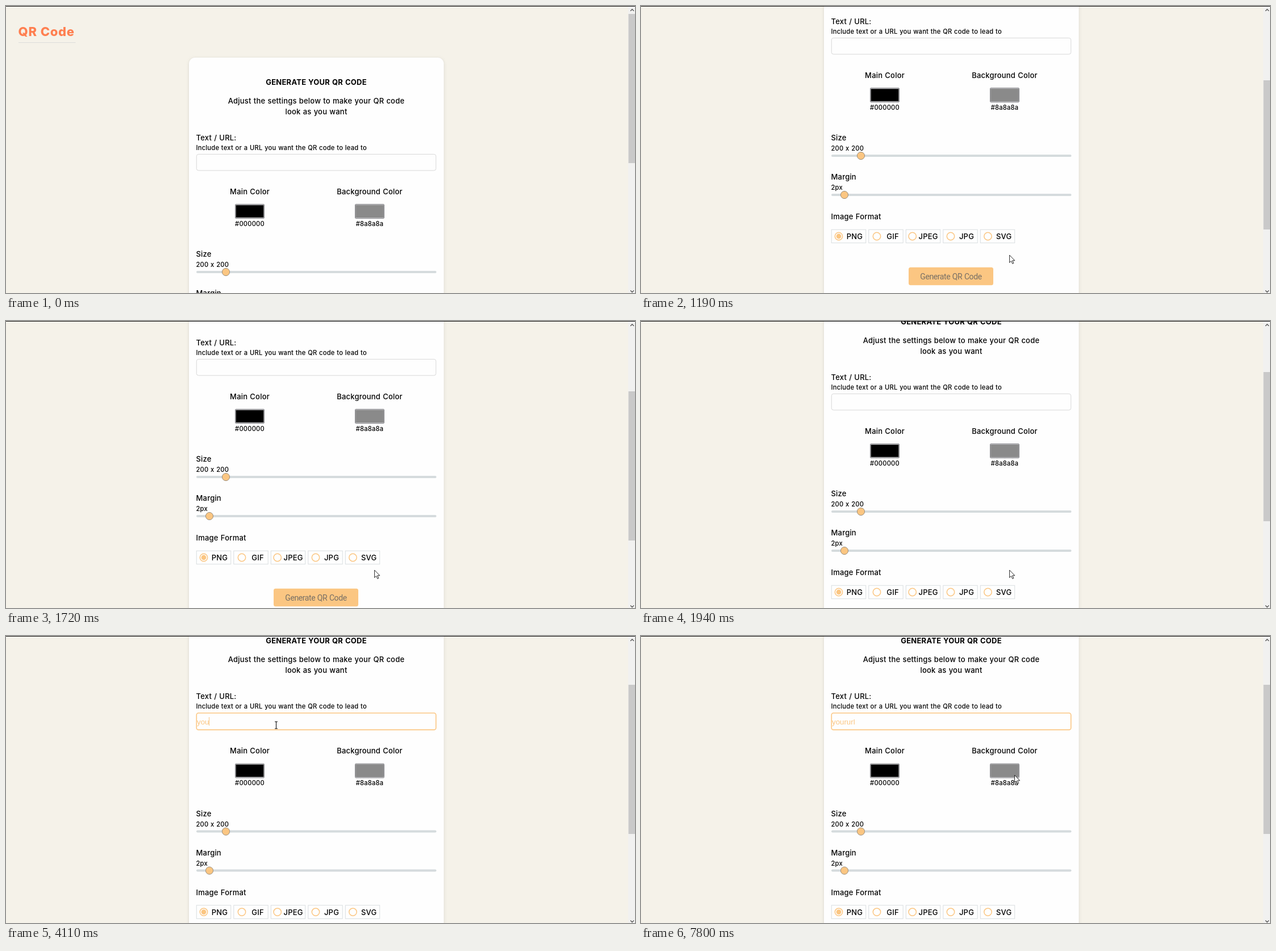
Recreate the animation shown at these times as an HTML page. Size 1107x506 px, loop 8000 ms.

```html
<!DOCTYPE html>
<html lang="en">
<head>
<meta charset="utf-8">
<title>QR code form</title>
<style>
  html, body { margin: 0; width: 100%; height: 100%; overflow: hidden; background: #f5f2e9; }
  svg { display: block; }
  text { font-family: Inter, "Open Sans", sans-serif; font-size: 13px; font-weight: 500; letter-spacing: .2px; word-spacing: .5px; fill: #000; }
  .small { font-size: 11.2px; }
  .mid { text-anchor: middle; }
  .head { font-weight: 700; letter-spacing: .25px; }
  .title { font-size: 22px; font-weight: 800; letter-spacing: .7px; fill: #ff7f50; }
  .button { font-family: Roboto, sans-serif; font-size: 14px; font-weight: 400; letter-spacing: -.4px; fill: #776f65; }
  .typed { font-family: "Liberation Sans", Arial, sans-serif; font-size: 13.3px; font-weight: 400; letter-spacing: 0; fill: #fbc682; }
</style>
</head>
<body>
<svg id="stage" width="1107" height="506" viewBox="0 0 1107 506">
  <defs>
    <filter id="shadow" x="-5%" y="-5%" width="110%" height="110%">
      <feDropShadow dx="0" dy="1" stdDeviation="2.5" flood-color="#8a8a80" flood-opacity=".3"/>
    </filter>
  </defs>
  <rect width="1107" height="506" fill="#f5f2e9"/>
  <g id="page">
    <text class="title" x="21.5" y="52.7">QR Code</text>
    <path d="M22 64.5H122.5" stroke="#dcdcda"/>
    <rect x="322" y="91" width="448.5" height="631" rx="11" fill="#fefefe" filter="url(#shadow)"/>
    <text class="mid head" x="546" y="139">GENERATE YOUR QR CODE</text>
    <text class="mid" x="546" y="171.7">Adjust the settings below to make your QR code</text>
    <text class="mid" x="546" y="191.2">look as you want</text>
    <text x="334.5" y="236.8">Text / URL:</text>
    <text class="small" x="334.5" y="254">Include text or a URL you want the QR code to lead to</text>
    <rect id="field" x="335.3" width="421.4" rx="3.5" fill="#fefefe"/>
    <text id="typed" class="typed" x="336" y="281.7"></text>
    <path id="caret" stroke="#fbc682"/>
    <g id="lower"></g>
  </g>
  <rect x="1095" width="12" height="506" fill="#f1f1f0"/>
  <rect id="thumb" x="1095.5" width="11.5" height="263" fill="#c9c9c9"/>
  <path d="M1099 8.8L1102 5.8L1105 8.8M1099 501.5L1102 504.5L1105 501.5" fill="none" stroke="#555" stroke-width="1.4"/>
  <path d="M0 .5H1107" stroke="#161616"/>
  <path id="arrow" d="M0 0V13.2L3 10.4L5.2 15.2L7.3 14.2L5.1 9.6H9.3Z" fill="#fff" stroke="#111" stroke-width=".9" stroke-linejoin="round"/>
  <path id="beam" d="M-2.5 -6H-.6L0 -5.4L.6 -6H2.5M0 -5.5V5.8M-2.5 6.3H-.6L0 5.7L.6 6.3H2.5" fill="none" stroke="#111" stroke-width="1.1"/>
</svg>
<script>
const LOOP = 8000, ORANGE = '#fbc682';
const el = id => document.getElementById(id);
const [page, field, typed, caret, lower, thumb, arrow, beam] =
  ['page', 'field', 'typed', 'caret', 'lower', 'thumb', 'arrow', 'beam'].map(el);

const label = (x, y, str, cls = '') => `<text x="${x}" y="${y}" class="${cls}">${str}</text>`;

const swatch = (cx, name, color) =>
  label(cx, 331.6, name, 'mid') +
  `<rect x="${cx - 25.5}" y="349.5" width="51" height="25" rx="1.5" fill="#e9e9ed" stroke="#858589"/>
   <rect x="${cx - 24.3}" y="351" width="48.6" height="22" fill="${color}" stroke="#777" stroke-width=".6"/>` +
  label(cx, 387.8, color, 'mid small');

const slider = (y, name, value, knob) =>
  label(334.5, y - 26.8, name) + label(334.5, y - 9, value, 'small') +
  `<rect x="335" y="${y - 2}" width="422.5" height="4" rx="2" fill="#d5dbdd"/>
   <circle cx="${knob}" cy="${y}" r="6.6" fill="${ORANGE}" stroke="#9a8f80"/>`;

const option = ([name, dot, x], i) =>
  `<rect x="${335.3 + i * 65.5}" y="599.2" width="60.4" height="23.5" fill="none" stroke="#d9dee0"/>
   <circle cx="${dot}" cy="611" r="6.7" fill="none" stroke="${ORANGE}" stroke-width="1.5"/>` +
  (i ? '' : `<circle cx="${dot}" cy="611" r="4.4" fill="${ORANGE}"/>`) +
  label(x, 616, name, 'mid');

lower.innerHTML =
  swatch(429, 'Main Color', '#000000') +
  swatch(640, 'Background Color', '#8a8a8a') +
  slider(469, 'Size', '200 x 200', 387) +
  slider(538, 'Margin', '2px', 358) +
  label(334.5, 581, 'Image Format') +
  [['PNG', 348, 376], ['GIF', 415, 443], ['JPEG', 477.7, 505.7], ['JPG', 545, 573], ['SVG', 610.5, 638.7]]
    .map(option).join('') +
  `<rect x="471" y="665.7" width="149" height="31.5" rx="3.5" fill="${ORANGE}"/>` +
  label(545.5, 687, 'Generate QR Code', 'mid button');

const ease = {
  linear: u => u,
  in: u => u * u,
  out: u => 1 - (1 - u) ** 2,
  both: u => u * u * (3 - 2 * u)
};

// Keys are [time, values, easing of the way to this key].
function follow(keys, t) {
  const next = keys.findIndex(k => k[0] > t);
  if (next === 0) return keys[0][1];
  if (next < 0) return keys[keys.length - 1][1];
  const [t0, from] = keys[next - 1], [t1, to, how = 'linear'] = keys[next];
  const u = ease[how]((t - t0) / (t1 - t0));
  return from.map((v, i) => v + (to[i] - v) * u);
}

const scrollKeys = [
  [800, [0]], [1180, [205]], [1400, [260], 'out'], [1500, [252], 'in'],
  [1710, [194]], [2000, [126], 'out']
];
const pointerKeys = [
  [250, [984, 497]], [580, [648.6, 439.2], 'out'], [2000, [648.6, 439.2]],
  [2493, [481.5, 163], 'both'], [2638, [475.5, 157], 'out'],
  [7030, [475.5, 157]], [7740, [657.5, 245.3], 'both']
];
// [time, text, caret visible]
const typing = [
  [0, '', 0], [2840, '', 1], [3450, '', 0], [3710, 'y', 1], [3910, 'yo', 1], [4010, 'you', 1],
  [4510, 'you', 0], [5040, 'you', 1], [5570, 'you', 0], [5770, 'your', 1], [5970, 'youru', 1],
  [6170, 'yourur', 1], [6500, 'yoururl', 1], [6650, 'yoururl', 0], [7180, 'yoururl', 1], [7710, 'yoururl', 0]
];

// The screen refreshes about fifteen times a second.
const TICK = 66.38;
const hold = t => 250 + Math.floor((t - 250) / TICK) * TICK;

function draw(t) {
  const held = hold(t);
  const scroll = Math.round(follow(scrollKeys, held)[0]);
  page.setAttribute('transform', `translate(0 ${-scroll})`);
  thumb.setAttribute('y', Math.round(14.4 + scroll * .567));

  const focus = t < 2840 ? 0 : t < 2910 ? .5 : 1;
  field.setAttribute('y', 261.4 + focus * .4);
  field.setAttribute('height', 28.6 + focus);
  field.setAttribute('stroke', focus ? ORANGE : '#d8d8d8');
  field.setAttribute('stroke-width', 1 + focus * .6);
  lower.setAttribute('transform', `translate(0 ${focus * 1.6})`);

  const [, str, blink] = typing.filter(k => k[0] <= t).pop();
  typed.textContent = str;
  const end = Math.round(336 + (str ? typed.getComputedTextLength() : 1)) + .5;
  caret.setAttribute('d', `M${end} 269V284`);
  caret.style.display = blink ? '' : 'none';

  const [x, y] = follow(pointerKeys, held);
  const inField = x > 335 && x < 757 && y > 261 - scroll && y < 292 - scroll;
  arrow.style.display = t >= 250 && !inField ? '' : 'none';
  beam.style.display = t >= 250 && inField ? '' : 'none';
  for (const p of [arrow, beam]) p.setAttribute('transform', `translate(${x} ${y})`);
}

const start = performance.now();
function frame() {
  draw((performance.now() - start) % LOOP);
  requestAnimationFrame(frame);
}
frame();
</script>
</body>
</html>
```
